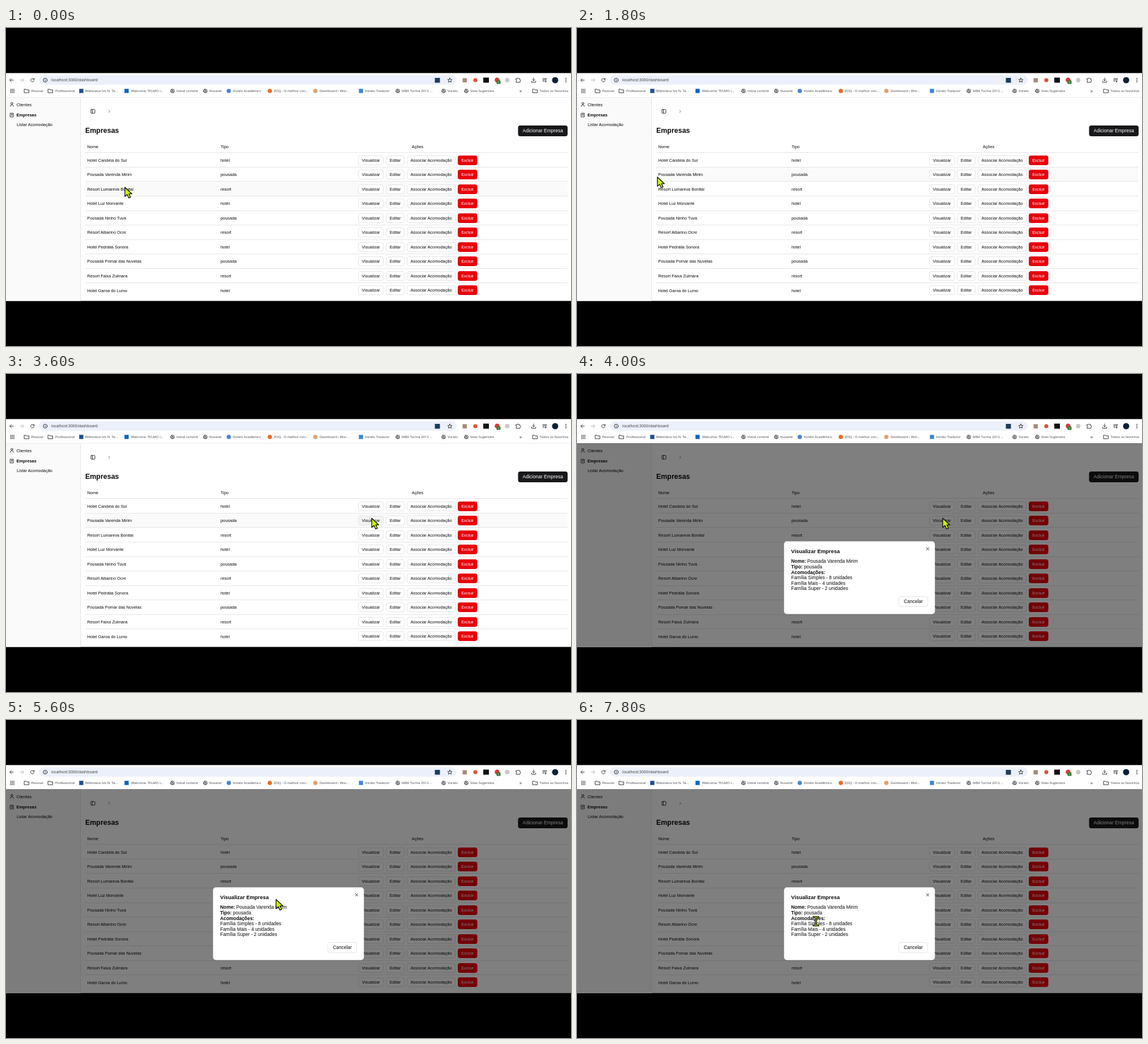
An HTML page that plays this animation: 998 by 561 pixels, repeating every 8000 ms.

```html
<!DOCTYPE html>
<html lang="pt-BR">
<head>
<meta charset="utf-8">
<title>Empresas</title>
<style>
  html, body { margin: 0; width: 100%; height: 100%; overflow: hidden; background: #000; }
  svg { display: block; width: 998px; height: 561px; }
  text { font-family: "Liberation Sans", Arial, sans-serif; font-size: 7.4px; fill: #0a0a0a; white-space: pre; }
  .bar text { font-family: "Open Sans", sans-serif; font-size: 6px; fill: #3c4043; }
  .line { fill: none; stroke: #333; stroke-width: 1; stroke-linecap: round; stroke-linejoin: round; }
</style>
</head>
<body>
<svg id="stage" viewBox="0 0 998 561"></svg>
<script>
const NS = 'http://www.w3.org/2000/svg';
const LOOP = 8000, TICK = 200, DIALOG_AT = 4000;
const PAGE_TOP = 122, PAGE_H = 359.5;
const ROW_TOP = 220.3, ROW_H = 25.55;

const stage = document.getElementById('stage');

function add(parent, tag, attrs = {}, content) {
  const el = document.createElementNS(NS, tag);
  for (const key in attrs) el.setAttribute(key, attrs[key]);
  if (content !== undefined) el.textContent = content;
  parent.appendChild(el);
  return el;
}
const group = (parent, attrs) => add(parent, 'g', attrs);
const rect = (parent, x, y, width, height, fill, extra) =>
  add(parent, 'rect', { x, y, width, height, fill, ...extra });
const circle = (parent, cx, cy, r, fill, extra) =>
  add(parent, 'circle', { cx, cy, r, fill, ...extra });
const line = (parent, d, extra) => add(parent, 'path', { d, class: 'line', ...extra });
const text = (parent, x, y, content, style = '', anchor = 'start') =>
  add(parent, 'text', { x, y, style, 'text-anchor': anchor }, content);

function button(parent, x, y, w, h, label, size = 7.4) {
  const box = rect(parent, x + .5, y + .5, w - 1, h - 1, '#fff', { rx: 3.5, stroke: '#e5e5e5' });
  text(parent, x + w / 2, y + h / 2 + size * .33, label, `font-size:${size}px`, 'middle');
  return box;
}
function solidButton(parent, x, y, w, h, fill, label, size = 7.4) {
  rect(parent, x, y, w, h, fill, { rx: 4 });
  text(parent, x + w / 2, y + h / 2 + size * .33, label, `font-size:${size}px;fill:#fff`, 'middle');
}

// Browser bar
function folder(parent, x) {
  line(parent, `M${x - 4} 108h3l1 1.2h4v5h-8z`, { 'stroke-width': .8 });
}
function globe(parent, x) {
  circle(parent, x, 111, 3.8, '#5f6368');
  line(parent, `M${x - 2.5} 109.5l2 1.5-1 2M${x + .5} 108.5l2 1.5-1.5 2.5`, { style: 'stroke:#fff' });
}
function drawBar() {
  const bar = group(stage, { class: 'bar' });
  rect(bar, 0, 79.5, 998, PAGE_TOP - 79.5, '#fff');
  rect(bar, 58, 83.5, 738, 16.5, '#ecf0fa', { rx: 8.2 });
  line(bar, 'M13 92H6.8M9.5 89.2L6.7 92l2.8 2.8');
  line(bar, 'M25 92h6.2M28.5 89.2l2.8 2.8-2.8 2.8', { style: 'stroke:#b5b5b5' });
  line(bar, 'M49.3 90.5A3 3 0 1 0 49.5 93M49.8 88.8v2.2h-2.2');
  circle(bar, 69.3, 92, 3.5, 'none', { class: 'line' });
  line(bar, 'M69.3 91.8v1.8M69.3 90.2v.1');
  text(bar, 80, 94.4, 'localhost:3000/dashboard', 'font-size:6.75px;fill:#333');

  rect(bar, 757.5, 88, 9, 8.5, '#1d3d5c');
  line(bar, 'M784 88.2l1.1 2.6 2.8.2-2.1 1.8.7 2.8-2.5-1.5-2.5 1.5.7-2.8-2.1-1.8 2.8-.2z', { 'stroke-width': .8 });
  rect(bar, 806.5, 88.5, 7.5, 7.5, '#a58b7a');
  circle(bar, 829, 92, 3.6, '#d9533b');
  rect(bar, 843, 87.5, 10, 9, '#111');
  circle(bar, 867.5, 91.7, 4.3, '#d93a35');
  rect(bar, 866.5, 92.3, 7, 6.5, '#2e7d32', { rx: 1.5 });
  text(bar, 870, 97.7, '1', 'font-size:5px;fill:#fff', 'middle');
  circle(bar, 885.3, 92, 4, '#c9c9c9');
  line(bar, 'M901 89.5h2.2a1.2 1.2 0 0 1 2.6 0h2v2.2a1.2 1.2 0 0 1 0 2.4v1.7H901v-2a1.2 1.2 0 0 0 0-2.4z');
  line(bar, 'M932 88v5M929.8 91l2.2 2.2 2.2-2.2M928.3 93.7v2h7.4v-2');
  line(bar, 'M948 89.2h5M948 91.5h4M948 93.8h2.5M953.7 94.5v-5.3h1.3');
  circle(bar, 953, 94.6, 1.2, '#333');
  circle(bar, 970, 92, 5.5, '#0d2036');
  for (const y of [89, 92, 95]) circle(bar, 989, y, .9, '#333');

  for (let i = 0; i < 9; i++)
    rect(bar, 7.5 + i % 3 * 2.7, 107.5 + Math.floor(i / 3) * 2.7, 1.8, 1.8, '#555');
  const mark = (shape, color) => (parent, x) => shape === 'dot'
    ? circle(parent, x, 111, 3.8, color)
    : rect(parent, x - 3.7, 107.3, 7.4, 7.4, color);
  const bookmarks = [
    [36.5, folder, 'Pessoal', 44.5],
    [78.5, folder, 'Professional', 87],
    [133, mark('box', '#1d4f91'), 'Biblioteca Ivo N. Ta...', 140],
    [213, mark('box', '#0a66c2'), 'Welcome, TELMO I...', 221],
    [294, globe, 'Initial commit', 301],
    [352, globe, 'Nuvarel', 359],
    [393.5, mark('dot', '#4a83d6'), 'Vorelo Acadêmico', 400.5],
    [466, mark('dot', '#ee6a1f'), 'ZOQ - O melhor con...', 473],
    [546.5, mark('dot', '#e0a070'), 'Dashboard ‹ Wor...', 554],
    [627, mark('box', '#4285d6'), 'Vorelo Tradutor', 634],
    [692, globe, 'MBA Turma 2012 ...', 699],
    [773, globe, 'Vorelo', 780],
    [813, globe, 'Sites Sugeridos', 820],
    [934.5, folder, 'Todos os favoritos', 942.5]
  ];
  for (const [iconX, icon, label, x] of bookmarks) {
    icon(bar, iconX);
    text(bar, x, 113.2, label);
  }
  text(bar, 909, 113.6, '»', 'font-size:9px', 'middle');
}

// Page
const companies = [
  ['Hotel Candeia do Sul', 'hotel'],
  ['Pousada Varenda Mirim', 'pousada'],
  ['Resort Lumareva Bonital', 'resort'],
  ['Hotel Luz Morvante', 'hotel'],
  ['Pousada Ninho Tuvá', 'pousada'],
  ['Resort Albarino Ocre', 'resort'],
  ['Hotel Pedrália Sonora', 'hotel'],
  ['Pousada Pomar das Nuvelas', 'pousada'],
  ['Resort Faixa Zulmara', 'resort'],
  ['Hotel Garoa do Lumo', 'hotel']
];
const rows = [];

function drawPage() {
  const page = group(stage);
  rect(page, 0, PAGE_TOP, 998, PAGE_H, '#fff');
  rect(page, 0, PAGE_TOP, 131, PAGE_H, '#fafafa');
  rect(page, 131, PAGE_TOP, 1, PAGE_H, '#e5e5e5');
  rect(page, 0, PAGE_TOP, 998, .7, '#e4e6ea');

  circle(page, 10.3, 133, 1.7, 'none', { class: 'line' });
  line(page, 'M7.6 138.3v-1q0-1.6 2.7-1.6t2.7 1.6v1');
  line(page, 'M7.6 150.3h5.4v6.6H7.6zM9.3 152.3h2M9.3 154h2');
  text(page, 18.5, 137.5, 'Clientes');
  text(page, 18.5, 156.2, 'Empresas', 'font-weight:bold');
  text(page, 19, 172.7, 'Listar Acomodação');

  rect(page, 150, 143.7, 7, 6.6, 'none', { class: 'line', rx: 1 });
  line(page, 'M152.5 144v6');
  line(page, 'M181.4 145l1.9 2.1-1.9 2.1', { style: 'stroke:#777' });
  text(page, 140, 185, 'Empresas', 'font-weight:bold;font-size:12.45px');
  solidButton(page, 904.5, 172, 87.5, 19, '#18181b', 'Adicionar Empresa', 8.45);

  text(page, 143.5, 212.2, 'Nome');
  text(page, 379, 212.2, 'Tipo');
  text(page, 727, 212.2, 'Ações', '', 'middle');
  companies.forEach(([name, kind], i) => {
    const top = ROW_TOP + i * ROW_H, mid = top + 12.7;
    const back = rect(page, 140, top, 852, ROW_H, '#fff');
    rect(page, 140, Math.round(top) - 1, 852, 1, '#e5e5e5');
    text(page, 143.5, mid + 2.6, name);
    text(page, 379, mid + 2.6, kind);
    const y = Math.round(mid - 8.5);
    const view = button(page, 622, y, 45, 17, 'Visualizar');
    button(page, 671, y, 33, 17, 'Editar');
    button(page, 708, y, 86, 17, 'Associar Acomodação');
    solidButton(page, 798, y, 34.5, 17, '#e7000b', 'Excluir');
    rows.push({ back, view });
  });
}

function drawDialog() {
  const layer = group(stage);
  rect(layer, 0, PAGE_TOP, 998, PAGE_H, '#000', { opacity: .5 });
  rect(layer, 365.7, 295.2, 266.5, 128.3, '#fff', { rx: 5 });
  text(layer, 378.3, 316.3, 'Visualizar Empresa', 'font-weight:bold;font-size:9.4px');
  line(layer, 'M617.2 306.3l4.4 4.4M621.6 306.3l-4.4 4.4', { 'stroke-width': .9 });
  const [name, kind] = companies[1];
  const lines = [
    ['Nome:', name], ['Tipo:', kind], ['Acomodações:', ''],
    ['', 'Família Simples - 8 unidades'],
    ['', 'Família Mais - 4 unidades'],
    ['', 'Família Super - 2 unidades']
  ];
  lines.forEach(([label, value], i) => {
    const row = text(layer, 378.3, 333.4 + i * 9.6, '', 'font-size:8.38px');
    if (label) add(row, 'tspan', { 'font-weight': 'bold' }, label + ' ');
    add(row, 'tspan', {}, value);
  });
  button(layer, 568, 392, 52, 19, 'Cancelar', 8.4);
  return layer;
}

drawBar();
drawPage();
const dialog = drawDialog();

// Pointer shapes, each drawn around its hot spot
const shapes = {
  arrow: 'M0 0V16.3L4 12.8 6.9 19 10 17.6 7.2 11.7H12.4Z',
  resize: 'M-11.3 0L-5.5-5V-1.7H5.5V-5L11.3 0 5.5 5V1.7H-5.5V5Z',
  beam: 'M-5-8.5H5V-6.5H1.2V6.5H5V8.5H-5V6.5H-1.2V-6.5H-5Z'
};
const pointer = add(stage, 'path', {
  fill: '#c6f20a', stroke: '#000', 'stroke-width': 1.2, 'stroke-linejoin': 'round'
});

const moves = [
  [0, 'arrow', 210, 281],
  [200, 'arrow', 207, 280],
  [1000, 'arrow', 137, 264],
  [1400, 'arrow', 138, 264],
  [1800, 'arrow', 142, 263],
  [2000, 'arrow', 137, 262],
  [2200, 'resize', 131, 261.5],
  [2400, 'resize', 130, 261.5],
  [2600, 'arrow', 144, 259],
  [2800, 'arrow', 240, 257],
  [3200, 'arrow', 560, 255],
  [3400, 'arrow', 638, 254.5],
  [3600, 'arrow', 646, 254.5],
  [5000, 'arrow', 646, 254.5],
  [5200, 'arrow', 632, 261],
  [5600, 'arrow', 477, 316.5],
  [5800, 'beam', 452, 340],
  [6200, 'beam', 440, 370],
  [6800, 'beam', 450, 359],
  [7400, 'beam', 429, 375],
  [7800, 'beam', 422, 355]
];

function pointerAt(t) {
  let i = moves.length - 1;
  while (moves[i][0] > t) i--;
  const [t0, kind, x0, y0] = moves[i];
  const [t1, , x1, y1] = moves[i + 1] || [LOOP, kind, x0, y0];
  const k = (t - t0) / (t1 - t0);
  return { kind, x: x0 + (x1 - x0) * k, y: y0 + (y1 - y0) * k };
}

function render(t) {
  const { kind, x, y } = pointerAt(t);
  const open = t >= DIALOG_AT;
  pointer.setAttribute('d', shapes[kind]);
  pointer.setAttribute('transform', `translate(${x} ${y})`);
  dialog.style.display = open ? '' : 'none';

  const hovered = !open && x >= 140 ? Math.floor((y - ROW_TOP) / ROW_H) : -1;
  rows.forEach(({ back, view }, i) => {
    const over = i === hovered;
    back.setAttribute('fill', over ? '#fafafb' : '#fff');
    view.setAttribute('fill', over && x > 622 && x < 667 ? '#f4f4f5' : '#fff');
  });
}

function frame() {
  const t = performance.now() % LOOP;
  render(Math.floor(t / TICK) * TICK);
  requestAnimationFrame(frame);
}
frame();
</script>
</body>
</html>
```
